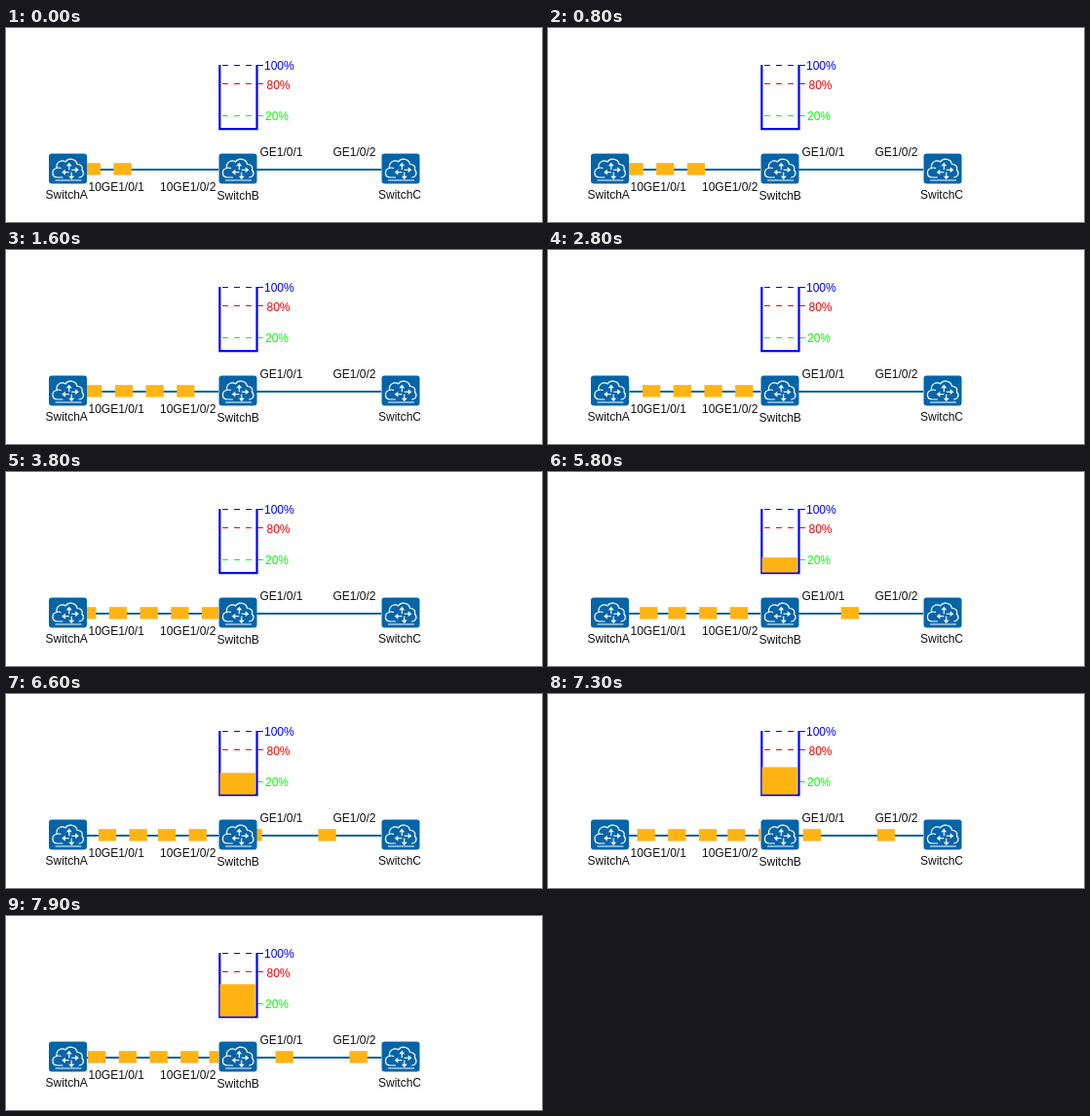
Recreate the animation shown at these times as an HTML page. Size 550x200 px, loop 8 s.

```html
<!DOCTYPE html>
<html lang="en">
<head>
<meta charset="utf-8">
<title>Switch buffer</title>
<style>
  html, body { margin: 0; width: 100%; height: 100%; overflow: hidden; background: #fff; }
  svg { display: block; }
  text { font: 12px "Liberation Sans", Arial, sans-serif; fill: #111; }
  .link { stroke: #0464a4; stroke-width: 2; }
  .level { stroke-width: 1; stroke-dasharray: 6 6; }
  .packet { fill: #ffb414; }
</style>
</head>
<body>
<svg width="550" height="200" viewBox="0 0 550 200">
  <defs>
    <clipPath id="clipAB"><rect x="83" y="130" width="135" height="30"/></clipPath>
    <clipPath id="clipBC"><rect x="257" y="130" width="128" height="30"/></clipPath>
    <path id="arrow" d="M-2 -1V-5H-4.5L-1.2 -9L2 -5H-0.4V-1Z"/>
    <g id="switch">
      <rect width="39" height="31" rx="3" fill="#0464a8"/>
      <path d="M14 24.5H8.5C2.5 24 2.5 16 8 15C7 9 13 5.5 17 8.5C20 4 28 5 29 11C33.5 11 35 14 34 17C37 20 35 24.5 31 24.5M7 27.5H33M8 15Q10 14 12 15"
        fill="none" stroke="#fff" stroke-width="1.2" stroke-linecap="round"/>
      <g transform="translate(22 18)" fill="#fff" stroke="#0464a8" stroke-width=".4">
        <use href="#arrow"/>
        <use href="#arrow" transform="rotate(90)"/>
        <use href="#arrow" transform="rotate(180)"/>
        <use href="#arrow" transform="rotate(270)"/>
      </g>
    </g>
  </defs>

  <path class="link" d="M83 146H218M257 146H385"/>
  <g id="linkAB" clip-path="url(#clipAB)"></g>
  <g id="linkBC" clip-path="url(#clipBC)"></g>

  <use href="#switch" x="44" y="129.5"/>
  <use href="#switch" x="218.5" y="129.5"/>
  <use href="#switch" x="385.5" y="129.5"/>

  <path class="level" stroke="#00f" d="M222 38.5H264"/>
  <path class="level" stroke="#f00" d="M222 57.5H264"/>
  <path class="level" stroke="#0f0" d="M222 90.5H264"/>
  <path d="M219.3 38V104.2H257.5V38" fill="none" stroke="#00f" stroke-width="2.2"/>
  <rect id="buffer" class="packet" x="219.5" width="36.2"/>

  <text x="265" y="43" style="fill:#00f">100%</text>
  <text x="267.5" y="63" style="fill:#f00">80%</text>
  <text x="266" y="95" style="fill:#0f0">20%</text>
  <text x="40.5" y="176">SwitchA</text>
  <text x="216.5" y="177">SwitchB</text>
  <text x="382" y="176">SwitchC</text>
  <text x="84.5" y="168">10GE1/0/1</text>
  <text x="158" y="168">10GE1/0/2</text>
  <text x="260.5" y="132">GE1/0/1</text>
  <text x="335.5" y="132">GE1/0/2</text>
</svg>
<script>
const LOOP = 8000, STEP = 100, PACKET_WIDTH = 18.3;
const QUEUE_START = 39, BUFFER_BOTTOM = 103.6;
const buffer = document.getElementById("buffer");

function makePackets(id, count) {
  const parent = document.getElementById(id);
  return Array.from({ length: count }, () => {
    const rect = document.createElementNS("http://www.w3.org/2000/svg", "rect");
    rect.setAttribute("class", "packet");
    rect.setAttribute("y", 139.2);
    rect.setAttribute("width", PACKET_WIDTH);
    rect.setAttribute("height", 12.4);
    return parent.appendChild(rect);
  });
}

const incoming = makePackets("linkAB", 13);
const outgoing = makePackets("linkBC", 2);

function draw(time) {
  const step = Math.floor((time % LOOP) / STEP);
  const queued = step >= QUEUE_START;

  incoming.forEach((rect, k) => {
    // The second burst follows slightly closer than the regular spacing.
    const shift = k >= 8 ? 2.4 : 0;
    rect.setAttribute("x", 110.4 + 4.05 * step - 31.7 * k + shift);
  });

  outgoing.forEach((rect, k) => {
    rect.setAttribute("x", 268.5 + 2.47 * (step - 45) - 76 * k);
    rect.setAttribute("visibility", queued ? "visible" : "hidden");
  });

  const height = queued ? Math.max(0, 4.4 + 0.85 * (step - 45)) : 0;
  buffer.setAttribute("y", BUFFER_BOTTOM - height);
  buffer.setAttribute("height", height);
}

const start = performance.now();
function tick() {
  draw(performance.now() - start);
  requestAnimationFrame(tick);
}
tick();
</script>
</body>
</html>
```
